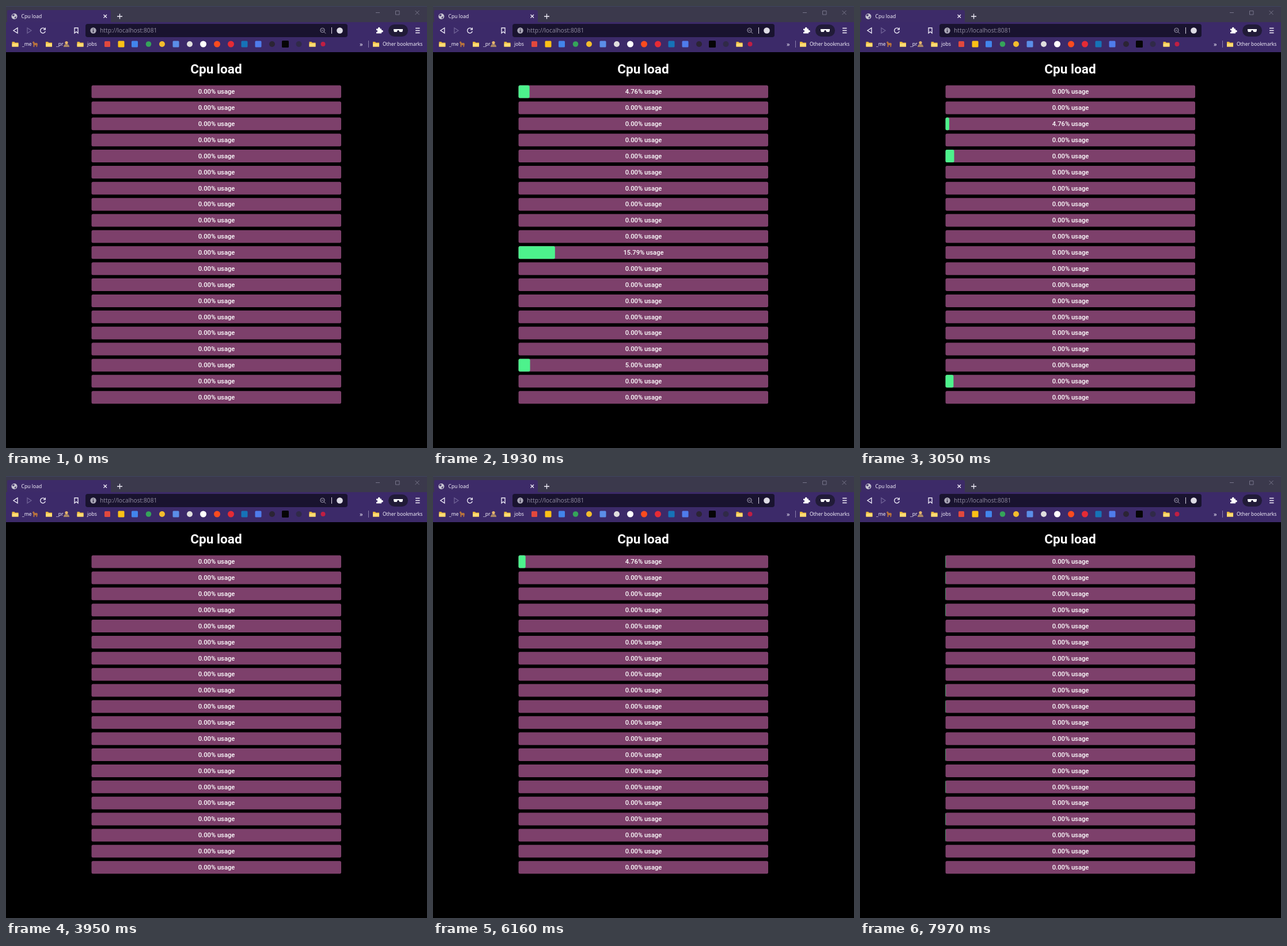
An HTML page that plays this animation: 731 by 766 pixels, repeating every 8000 ms.

```html
<!DOCTYPE html>
<html lang="en">
<head>
<meta charset="utf-8">
<title>Cpu load</title>
<style>
  html, body { margin: 0; width: 100%; height: 100%; overflow: hidden; background: #000; }
  svg { display: block; width: 100%; height: 100%; }
  .ui { font-family: "Noto Sans", "Open Sans", sans-serif; font-size: 8.6px; fill: #f2effa; }
  .page { font-family: Roboto, Arial, sans-serif; fill: #fff; text-anchor: middle; }
  .line { fill: none; stroke: #f2effa; stroke-width: 1.3; }
  .dim { stroke: #8b80ad; }
</style>
</head>
<body>
<svg id="stage" viewBox="0 0 731 766" xmlns="http://www.w3.org/2000/svg">
  <defs>
    <g id="folder">
      <path d="M-5.5 -4h4l1.3 1.5h5.7v7h-11z" fill="#e9b83c"/>
      <path d="M-5.5 -1.2h11v5.7h-11z" fill="#ffdc72"/>
    </g>
  </defs>
  <rect width="731" height="766"/>
  <rect width="731" height="30" fill="#3b394c"/>
  <rect width="731" height="1" fill="#3f4560"/>
  <path d="M2 30V10q0-3 3-3H179q3 0 3 3V30z" fill="#3d2b68"/>
  <rect y="28" width="731" height="52" fill="#3c2a69"/>

  <g class="ui">
    <circle cx="14.5" cy="18" r="5" fill="#c9c6d2"/>
    <path d="M11 15l3-1 1 2-2 2-2-1zM15 19l3-1-1 3-2 1z" fill="#4b3d70"/>
    <text x="26.5" y="21">Cpu load</text>
    <path class="line" d="M169.5 15l5.5 5.5m0-5.5l-5.5 5.5M193 18h9m-4.500-4.500v9"/>
    <path class="line dim" d="M642 11.500h7M676.500 8.500h6.500v6.500h-6.500zM710.500 8l7 7m0-7l-7 7" style="stroke:#77758a;stroke-width:1"/>

    <path class="line" d="M20 38v9l-7-4.500z"/>
    <path class="line dim" d="M37 38v9l7-4.500z" opacity=".65"/>
    <path class="line" d="M67.500 39.800a4.400 4.400 0 1 0 .8 4M68.300 37.500v3.300h-3.500"/>
    <path class="line" d="M119 38h6v9l-3-2.500-3 2.500z"/>
    <rect x="138" y="31" width="455" height="23" rx="4" fill="#19132f"/>
    <circle cx="151.500" cy="42.500" r="5.200" fill="#a9a6b5"/>
    <path d="M151.500 39.500v1.300m0 1.200v3.600" stroke="#19132f" stroke-width="1.400"/>
    <text x="163" y="46" style="font-size:10.200px" fill="#8b869c"><tspan style="fill:#8b869c">http://</tspan>localhost<tspan style="fill:#8b869c">:8081</tspan></text>
    <g class="line" style="stroke:#aaa6ba;stroke-width:1">
      <circle cx="549.500" cy="42" r="3.700"/><path d="M552.200 44.700l3 3M547.700 42h3.600"/>
    </g>
    <path d="M565.500 37v11" stroke="#d8d5e2"/>
    <circle cx="579.500" cy="42.500" r="5.300" fill="#dedce5"/>
    <path d="M643 39.500h3a1.900 1.900 0 1 1 3.500 0h2.500v2.500a1.900 1.900 0 1 1 0 3.400v2.100h-9v-2.500a1.600 1.600 0 1 0 0-3z" fill="#fff"/>
    <rect x="664" y="32" width="34" height="21" rx="10.500" fill="#211b38"/>
    <path d="M673 40h16v2l-1 3h-4.500l-1.500-3h-2l-1.500 3h-4.500l-1-3z" fill="#fff"/>
    <path class="line" d="M711 38.500h7.500m-7.500 4h7.500m-7.500 4h7.500"/>

    <text x="28" y="69">_me</text>
    <text x="87" y="69">_pr</text>
    <text x="141" y="69">jobs</text>
    <text x="614" y="69.500" style="font-size:11px">»</text>
    <text x="654" y="69" style="font-size:8.400px">Other bookmarks</text>
    <path d="M629.500 60v12" stroke="#8b80ad"/>
    <path d="M46 63l2-2 2 3h4l1 2-1 5h-1.500v-3h-3v3h-2v-5z" fill="#b5713d"/>
    <circle cx="105" cy="63.500" r="2.600" fill="#e7b56c"/>
    <path d="M100 71q0-5 5-5t5 5z" fill="#a98766"/>
    <g id="icons"></g>
  </g>

  <g class="page">
    <text x="365" y="117" font-size="22.600" font-weight="700">Cpu load</text>
    <g id="bars" font-size="11.200" font-weight="500"></g>
  </g>
</svg>
<script>
const NS = "http://www.w3.org/2000/svg";
const LOOP = 8000, ROWS = 20, LEFT = 148.5, WIDTH = 433.5;
const RAMP = 360, LEAD = 72; // a new value shows with its ramp already under way

function add(parent, tag, attrs) {
  const node = document.createElementNS(NS, tag);
  for (const key in attrs) node.setAttribute(key, attrs[key]);
  return parent.appendChild(node);
}

const icons = document.getElementById("icons");
for (const x of [16, 74.5, 129, 532, 642.5]) {
  add(icons, "use", { href: "#folder", transform: `translate(${x} 66)` });
}
const dot = (x, fill, r = 5.5) => add(icons, "circle", { cx: x, cy: 66, r, fill });
const tile = (x, fill, s = 11) =>
  add(icons, "rect", { x: x - s / 2, y: 66 - s / 2, width: s, height: s, rx: 1.5, fill });
tile(176, "#e2483d", 10);
tile(200, "#fbc116");
tile(223.5, "#4285ec");
dot(247.5, "#35a45a", 4.8);
dot(271, "#f3bd2d", 5);
tile(295, "#5b8ee8");
dot(319, "#e0dfdf", 5);
dot(342.5, "#fff");
dot(366.5, "#fb4b1e");
dot(390.5, "#e62b35");
tile(414, "#1673b8");
tile(438, "#4f7cec");
dot(462, "#2b2434", 5);
tile(485, "#050505", 12);
dot(508.5, "#302a48", 5);
dot(550.5, "#c01e43", 4);

const barsRoot = document.getElementById("bars");
const bars = Array.from({ length: ROWS }, (_, i) => {
  const y = 137.6 + 27.87 * i;
  const box = { x: LEFT, y, height: 22, rx: 2.5 };
  add(barsRoot, "rect", { ...box, width: WIDTH, fill: "#7d406b" });
  const fill = add(barsRoot, "rect", { ...box, width: 0, fill: "#4df28c" });
  const label = add(barsRoot, "text", { x: 365.5, y: y + 14.8 });
  return { fill, label };
});

// Each update gives the busy rows; all others are idle.
const updates = [
  [1670, { 0: 4.76, 10: 15.79, 17: 5 }],
  [1945, { 10: 5.26 }],
  [2195, {}],
  [2480, { 4: 5 }],
  [2735, { 4: 5, 18: 4.76 }],
  [3012, { 2: 4.76 }],
  [3260, {}],
  [5130, { 2: 4.76 }],
  [5390, {}],
  [6020, { 0: 4.76 }],
  [6290, { 10: 5 }],
  [6560, {}],
  [7200, { 0: 4.76, 8: 5, 14: 4.76 }],
  [7450, { 0: 4.76, 1: 5, 2: 4.76, 3: 5, 8: 5, 9: 4.76, 12: 5, 14: 4.76, 16: 5, 17: 4.76 }],
  [7693, {}]
];

function rowState(row, t) {
  let from = 0, target = 0, start = -RAMP;
  const level = at => from + (target - from) * Math.min(1, (at - start + LEAD) / RAMP);
  for (const [time, busy] of updates) {
    if (time > t) break;
    const next = busy[row] || 0;
    if (next === target) continue;
    from = level(time);
    target = next;
    start = time;
  }
  return { target, level: level(t) };
}

function render(t) {
  bars.forEach(({ fill, label }, row) => {
    const { target, level } = rowState(row, t);
    fill.setAttribute("width", (WIDTH * level / 100).toFixed(2));
    const text = target.toFixed(2) + "% usage";
    if (label.textContent !== text) label.textContent = text;
  });
}

const begin = performance.now();
function tick() {
  render((performance.now() - begin) % LOOP);
  requestAnimationFrame(tick);
}
tick();
</script>
</body>
</html>
```
